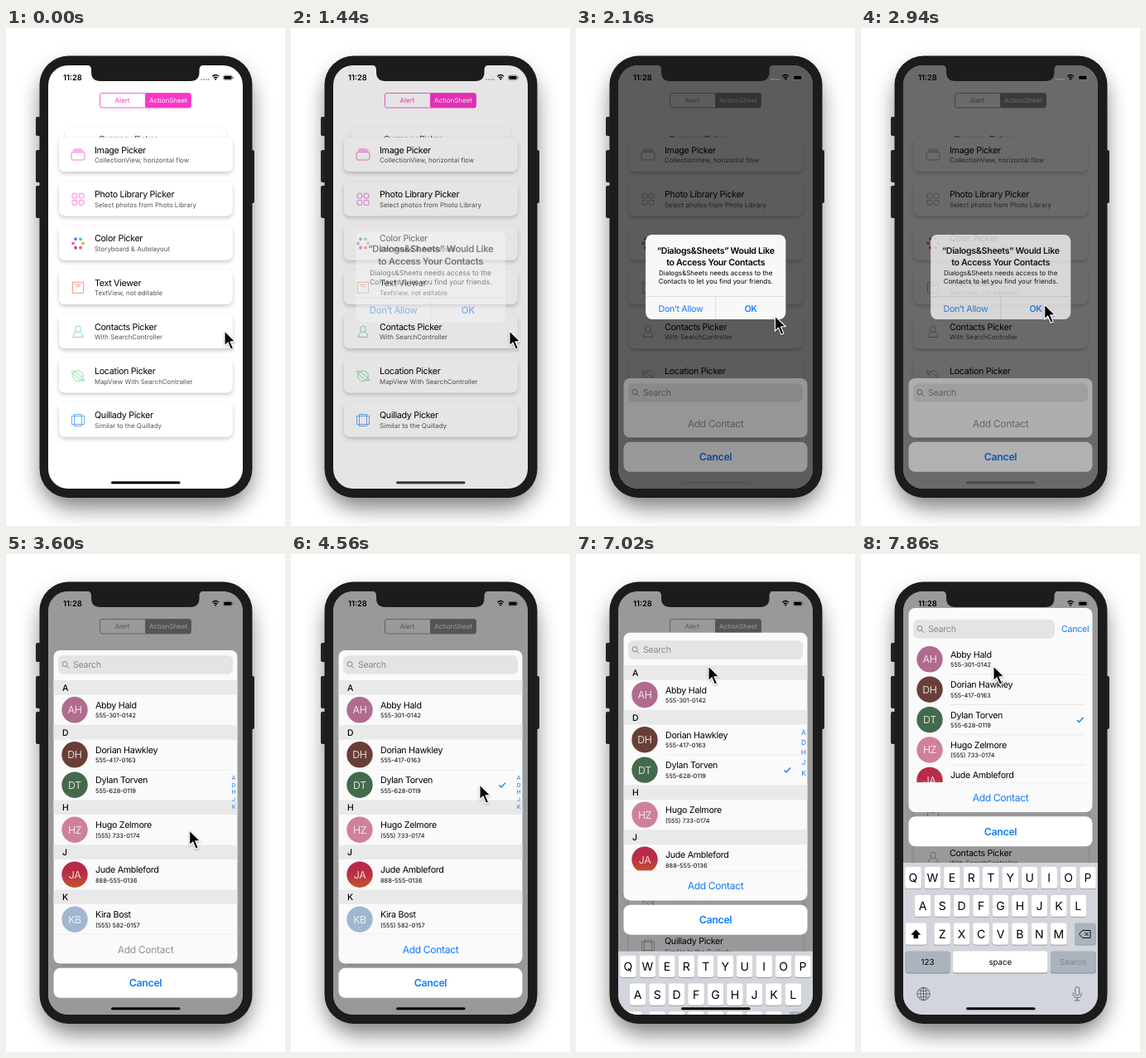
Animation of 337x600 px, one loop 8000 ms. Source, as an HTML page:

```html
<!DOCTYPE html>
<html lang="en">
<head>
<meta charset="utf-8">
<title>Picker sheets</title>
<style>
html, body { margin: 0; width: 100%; height: 100%; overflow: hidden; background: #fff; }
svg { display: block; font-family: Inter, Roboto, sans-serif; text-rendering: geometricPrecision; }
#stage { width: 100vw; height: 100vh; }
.tight { letter-spacing: -.028em; }
.bold { font-weight: 600; }
.mid { text-anchor: middle; }
.blue { fill: #147cfb; }
.line { fill: none; stroke: currentColor; stroke-width: .8; }
.tint { color: color-mix(in srgb, #8c8c8c var(--grey, 0%), var(--hue)); }
</style>
</head>
<body>
<svg id="stage" viewBox="0 0 337 600">
  <defs>
    <clipPath id="screen"><rect x="51" y="45" width="235" height="510" rx="24"/></clipPath>
    <filter id="soft" x="-30%" y="-30%" width="160%" height="160%"><feGaussianBlur stdDeviation="13"/></filter>
    <filter id="cardShadow" x="-10%" y="-30%" width="120%" height="180%">
      <feDropShadow dx="0" dy="2.4" stdDeviation="2.8" flood-opacity=".22"/>
    </filter>
    <filter id="arrowShadow" x="-50%" y="-50%" width="200%" height="200%">
      <feDropShadow dx="0" dy="1" stdDeviation=".9" flood-opacity=".35"/>
    </filter>
    <linearGradient id="ember" x1="0" y1="0" x2="0" y2="1">
      <stop offset=".4" stop-color="#b82b48"/><stop offset="1" stop-color="#c4522f"/>
    </linearGradient>
  </defs>

  <rect x="42" y="48" width="254" height="530" rx="38" opacity=".5" filter="url(#soft)"/>
  <g fill="#222">
    <rect x="36" y="107" width="9" height="23" rx="2"/>
    <rect x="36" y="147" width="9" height="39" rx="2"/>
    <rect x="36" y="190" width="9" height="39" rx="2"/>
    <rect x="291" y="147" width="9" height="64" rx="2"/>
  </g>
  <rect x="40.500" y="33.500" width="257" height="532.500" rx="35" fill="#1c1c1c"/>

  <g clip-path="url(#screen)">
    <rect x="51" y="45" width="235" height="510" fill="#fff"/>
    <g id="home"></g>
    <rect id="sheetDim" x="51" y="45" width="235" height="510"/>
    <g id="sheet"></g>
    <rect id="alertDim" x="51" y="45" width="235" height="510"/>
    <g id="alert"></g>
    <g id="keyboard"></g>
    <g id="status"></g>
    <rect id="indicator" x="127" y="546.3" width="83.5" height="3" rx="1.5"/>
  </g>
  <path fill="#1c1c1c" d="M97 44.5q6 0 6 6v2.5q0 11 11 11h108.500q11 0 11-11v-2.500q0-6 6-6z"/>
  <g id="pointer" filter="url(#arrowShadow)">
    <path d="M0 0V18l4-4 3.500 8.200 3-1.300-3.500-8 5.700-.4z" stroke="#fff" stroke-width="1.1"/>
  </g>
</svg>
<script>
const LOOP = 8000;
const PINK = '#fb35c7', CORAL = '#ee6a4c', GREEN = '#4fd07f', BLUE = '#2f86f0';
const el = id => document.getElementById(id);
const set = (id, attrs) => { for (const k in attrs) el(id).setAttribute(k, attrs[k]); };

// Text whose capitals are centred on cy.
const text = (x, cy, size, str, cls = '', extra = '') =>
  `<text x="${x}" y="${cy + size * .36}" font-size="${size}" class="${cls}" ${extra}>${str}</text>`;
const box = (x, y, w, h, r, fill, extra = '') =>
  `<rect x="${x}" y="${y}" width="${w}" height="${h}" rx="${r}" fill="${fill}" ${extra}/>`;
const frame = (x, y, w, h, r = 0) => box(x, y, w, h, r, 'none', 'class="line"');
const stroke = d => `<path class="line" d="${d}"/>`;
const tinted = (hue, body) => `<g class="tint" style="--hue:${hue}">${body}</g>`;

// Home screen; icons are centred on 0,0.
const dots = ['#f2994a', '#e8453c', '#c2185b', '#e040c8', '#2f6fed', '#2fc98a'].map((hue, i) =>
  `<circle cx="6" r="1.9" fill="${hue}" transform="rotate(${i * 60})"/>`).join('');
const tiles = [-7, 1.2].map(x => [-7, 1.2].map(y => frame(x, y, 5.8, 5.8, 1.8)).join('')).join('');
const items = [
  ['Image Picker', 'CollectionView, horizontal flow', PINK, frame(-8, -3.5, 16, 9.5, 2) + stroke('M-6.5-5.2h13M-5-7h10')],
  ['Photo Library Picker', 'Select photos from Photo Library', PINK, tiles],
  ['Color Picker', 'Storyboard &amp; Autolayout', PINK, dots],
  ['Text Viewer', 'TextView, not editable', CORAL, frame(-6.5, -6.5, 13, 13) + stroke('M-4-3.5h8M-2-1.3h4')],
  ['Contacts Picker', 'With SearchController', GREEN,
    '<ellipse class="line" cy="-3.2" rx="3.3" ry="3.8"/>' + stroke('M-2 0Q-6 2-6 6.500H6Q6 2 2 0')],
  ['Location Picker', 'MapView With SearchController', GREEN,
    '<circle class="line" r="6.3"/><ellipse class="line" rx="9.500" ry="2" transform="rotate(38)"/>'],
  ['Quillady Picker', 'Similar to the Quillady', BLUE, frame(-4.5, -7, 9, 14) + frame(-7.5, -5, 15, 10)]
];
const card = (title, note, hue, icon, y) =>
  box(64, y, 209.5, 41, 7, '#fff', 'filter="url(#cardShadow)"') +
  `<g transform="translate(87 ${y + 21})" opacity=".85">${tinted(hue, icon)}</g>` +
  text(107, y + 15, 10.7, title, 'tight') +
  text(107, y + 27.5, 7.9, note, '', 'fill="#555"');

el('home').innerHTML =
  tinted(PINK,
    box(113.5, 78.5, 110, 17.5, 2.5, '#fff', 'stroke="currentColor" stroke-width=".8"') +
    box(168, 78.5, 55.5, 17.5, 2, 'currentColor') +
    text(140.5, 87.3, 8, 'Alert', 'mid', 'fill="currentColor"') +
    text(196, 87.3, 8, 'ActionSheet', 'mid', 'fill="#fff"')) +
  `<g transform="translate(13.5 119.5) scale(.92)" opacity=".75">${card('Currency Picker', '', PINK, '', 0.5)}</g>` +
  items.map((item, i) => card(...item, 132 + i * 53.25)).join('');

el('status').innerHTML =
  text(69, 60, 9.4, '11:28', 'bold') +
  [0, 1, 2, 3].map(i => `<circle cx="${236 + i * 2.9}" cy="62" r=".9" fill="#999"/>`).join('') +
  '<path d="M249.300 58.300q3.900-3.600 7.800 0M250.900 60.200q2.300-2 4.600 0" fill="none" stroke="#000" stroke-width="1.3"/>' +
  '<circle cx="253.2" cy="61.8" r="1"/>' +
  box(262.4, 56.9, 11, 5.8, 1.5, 'none', 'stroke="#777" stroke-width=".6"') +
  box(263.3, 57.8, 9.2, 4, .8, '#000') + box(274, 58.7, 1, 2.2, .5, '#777');

// Contact sheet
const HEAD = 17.6, ROW = 36.4;
const people = [
  ['Abby Hald', '555-301-0142', '#b06b8e'],
  ['Dorian Hawkley', '555-417-0163', '#693e36'],
  ['Dylan Torven', '555-628-0119', '#436a4b'],
  ['Hugo Zelmore', '(555) 733-0174', '#cf8199'],
  ['Jude Ambleford', '888-555-0136', 'url(#ember)'],
  ['Kira Bost', '(555) 582-0157', '#9fb7d1']
];
const CHOSEN = 2;
const initial = i => people[i]?.[0][0];
const letters = [...new Set(people.map((_, i) => initial(i)))];
const rowY = (i, flat) => i * ROW + (flat ? 0 : (letters.indexOf(initial(i)) + 1) * HEAD);
const headY = l => rowY(people.findIndex(p => p[0][0] === l)) - HEAD;
const monogram = name => name.split(' ').map(w => w[0]).join('');

el('sheet').innerHTML =
  box(57.5, 0, 222, 0, 8, '#fafafa', 'id="panel"') +
  '<g id="search">' + box(63, -11.3, 211, 22.6, 6, '#e4e4e6', 'id="field"') +
  '<g fill="none" stroke="#85858a"><circle cx="71" cy="-.9" r="3"/><path d="M73.200 1.300l3 3"/></g>' +
  text(81, 0, 10.7, 'Search', 'tight', 'fill="#8a8a8f"') +
  box(81.3, -6.5, 1.4, 13, .5, '#3a66e0', 'id="caret"') +
  text(242, 0, 10.7, 'Cancel', 'tight blue', 'id="stop"') + '</g>' +
  '<svg id="list" x="57.5" width="222"><g transform="translate(-57.5 0)"><g id="heads">' +
  letters.map(l => box(57.5, headY(l), 222, HEAD, 0, '#e9e9e9') +
    text(68, headY(l) + 9, 10.4, l, '', 'font-weight="500"')).join('') + '</g>' +
  people.map(([name, phone, hue], i) => `<g id="row${i}">` +
    `<circle cx="83" cy="18.2" r="15.7" fill="${hue}"/>` +
    text(83, 18.2, 12.3, monogram(name), 'mid tight', 'fill="#fff" fill-opacity=".8"') +
    text(108, 12.4, 10.7, name, 'tight') + text(108, 25, 7.4, phone) +
    `<path id="rule${i}" d="M108 ${ROW}H270" stroke="#dedede" stroke-width=".6"/></g>`).join('') +
  '<path id="check" d="M-3.500 .3l2.500 2.600 5-5.500" fill="none" stroke="#147cfb" stroke-width="1.4"/></g></svg>' +
  '<g id="index">' + letters.map((l, i) => text(275, 0, 7, l, 'mid blue', `id="mark${i}"`)).join('') + '</g>' +
  '<g id="foot"><path id="footRule" d="M57.500-35.500h222" stroke="#e6e6e6" stroke-width=".6"/>' +
  text(168.5, -17.3, 12.1, 'Add Contact', 'mid tight', 'id="add"') +
  box(57.5, 5.3, 222, 36, 8, '#fff') +
  text(168.5, 23.3, 12.4, 'Cancel', 'mid tight bold blue') + '</g>';

// Alert, centred on 0,0
el('alert').innerHTML =
  box(-84.6, -51, 169.2, 102, 8, '#f8f8f8') +
  text(0, -32, 10.6, '“Dialogs&amp;Sheets” Would Like', 'mid tight bold') +
  text(0, -18, 10.6, 'to Access Your Contacts', 'mid tight bold') +
  text(0, -4.7, 8, 'Dialogs&amp;Sheets needs access to the', 'mid') +
  text(0, 5.3, 8, 'Contacts to let you find your friends.', 'mid') +
  '<path d="M-84.600 23.500h169.200M0 23.500V51" stroke="#cfcfd2" stroke-width=".6"/>' +
  text(-42.3, 37.7, 10.7, 'Don’t Allow', 'mid tight blue') +
  text(42.3, 37.7, 10.7, 'OK', 'mid tight bold blue');

// Keyboard, drawn from its own top edge
const KEY_GREY = '#abb3be', PITCH = 23.45, LEAD = 33.8;
const key = (x, row, w, fill = '#fff') =>
  box(x, 5.8 + row * LEAD, w, 26.2, 3, '#888b90') + box(x, 5 + row * LEAD, w, 26.2, 3, fill);
const keyText = (x, row, size, str, extra) => text(x, 18.2 + row * LEAD, size, str, 'mid', extra);
const letterKeys = ['QWERTYUIOP', 'ASDFGHJKL', 'ZXCVBNM'].map((keys, row) =>
  [...keys].map((k, i) => {
    const x = 168.5 + (i - (keys.length - 1) / 2) * PITCH;
    return key(x - 9.8, row, 19.6) + keyText(x, row, 14, k);
  }).join('')).join('');
el('keyboard').innerHTML =
  box(51, 0, 235, 183, 0, '#d2d5db') + letterKeys +
  key(53.5, 2, 25.7) + '<path d="M66.300 80.500l6 6.200h-3.200v4.500h-5.600v-4.500h-3.200z"/>' +
  key(258, 2, 25.7, KEY_GREY) +
  '<path d="M263.500 86l4-4.500h9.500v9h-9.500zM270.300 83.800l4.400 4.400m0-4.400l-4.400 4.400" fill="none" stroke="#111"/>' +
  key(53.5, 3, 54, KEY_GREY) + keyText(80.5, 3, 9.7, '123') +
  key(111, 3, 114.5) + keyText(168.3, 3, 9.7, 'space') +
  key(229, 3, 54.7, KEY_GREY) + keyText(256.3, 3, 9.7, 'Search', 'fill="#7d858f"') +
  '<g color="#50545a"><g transform="translate(75.5 158)"><circle class="line" r="7.7"/>' +
  '<ellipse class="line" rx="3.6" ry="7.7"/>' + stroke('M0-7.700V7.700M-7.700 0H7.700M-6.500-4.500q6.500 2.600 13 0M-6.500 4.500q6.500-2.600 13 0') + '</g>' +
  '<g transform="translate(261.2 158)">' + frame(-2.4, -8.5, 4.8, 10.5, 2.4) +
  stroke('M-5-1.500V0q0 4.500 5 4.500T5 0v-1.500M0 4.500V8M-3.200 8h6.400') + '</g></g>';

// Motion: every move advances in whole steps and has already moved at its start.
const clamp = v => Math.min(1, Math.max(0, v));
const smooth = v => v * v * (3 - 2 * v);
const easeOut = v => 1 - (1 - v) ** 2;
const move = (t, start, length, step) => clamp((Math.floor((t - start) / step) + 1) * step / length);

const hops = [
  { at: 1800, length: 780, to: [221.7, 333] },
  { at: 3660, length: 180, to: [235, 354] },
  { at: 3840, length: 360, to: [228, 278] },
  { at: 5520, length: 480, to: [160, 135] }
];
const pointerAt = t => hops.reduce((pos, { at, length, to }) => {
  const k = smooth(move(t, at, length, 60));
  return pos.map((v, i) => v + (to[i] - v) * k);
}, [264, 365]);

function draw(t) {
  const alertIn = move(t, 1440, 480, 120);
  const alertLeft = 1 - move(t, 2820, 600, 120) ** 1.6;
  const rise = move(t, 1680, 600, 120);
  const open = smooth(move(t, 3060, 360, 120));
  const typing = smooth(move(t, 7020, 405, 180));
  const searching = typing > .9, chosen = t >= 4560;

  const drop = 126 * (1 - smooth(rise));
  const top = 422 - 306 * open - 51 * typing + drop;
  const bottom = 493.5 - 182.5 * typing + drop;
  const listTop = top + 36 + 7.6 * typing, listEnd = bottom - 36;
  const shade = .4 * alertIn * alertLeft;

  el('home').style.setProperty('--grey', easeOut(rise) * 100 + '%');
  set('sheetDim', { opacity: .4 * rise });
  set('alertDim', { opacity: shade });
  set('alert', {
    opacity: easeOut(alertIn) * alertLeft,
    transform: `translate(168.7 300) scale(${1.09 - .09 * alertIn})`
  });
  set('indicator', { opacity: 1 - 2.3 * shade });

  set('sheet', { visibility: rise > 0 ? 'visible' : 'hidden' });
  set('panel', { y: top, height: bottom - top });
  set('search', { transform: `translate(0 ${top + 17.5 + 8 * typing})` });
  set('field', { width: searching ? 171 : 211 });
  set('stop', { opacity: +searching });
  set('caret', { opacity: searching ? clamp((7860 - Math.floor(t / 60) * 60) / 240) : 0 });

  set('list', { y: listTop, height: Math.max(0, listEnd - listTop), opacity: +(open > 0) });
  set('heads', { opacity: +!searching });
  people.forEach((_, i) => {
    const ruled = i + 1 < people.length && (searching || initial(i) === initial(i + 1));
    set('row' + i, { transform: `translate(0 ${rowY(i, searching)})` });
    set('rule' + i, { opacity: +ruled });
  });
  set('check', {
    opacity: +chosen,
    transform: `translate(${searching ? 264.5 : 255} ${rowY(CHOSEN, searching) + ROW / 2})`
  });

  set('index', { opacity: +(open === 1 && !searching) });
  letters.forEach((_, i) => set('mark' + i, {
    y: (listTop + listEnd) / 2 - 15.3 + (i - 2) * (8.6 + 8.4 * typing),
    'font-size': 7 + 3.6 * typing
  }));
  set('foot', { transform: `translate(0 ${bottom})` });
  set('footRule', { opacity: open });
  set('add', { fill: chosen ? '#147cfb' : '#949498' });
  set('keyboard', { transform: `translate(0 ${555 - 183 * typing})`, visibility: typing > 0 ? 'visible' : 'hidden' });
  set('pointer', { transform: `translate(${pointerAt(t)})` });
}

const start = performance.now();
function tick() {
  draw((performance.now() - start) % LOOP);
  requestAnimationFrame(tick);
}
tick();
</script>
</body>
</html>
```
